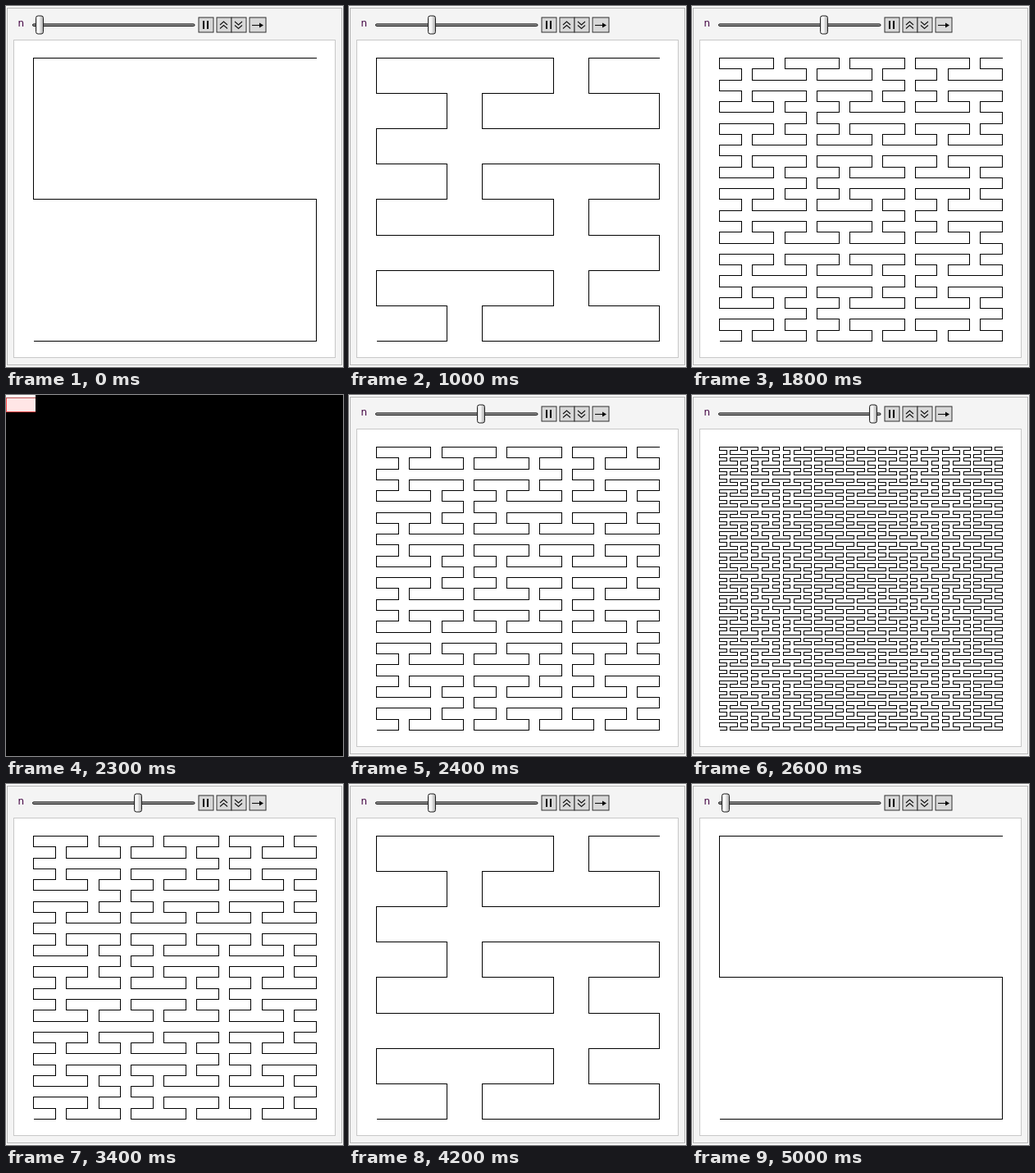
Write an HTML page that moves like this. It is 411 by 440 pixels and loops after 6000 ms.

```html
<!DOCTYPE html>
<html lang="en">
<head>
<meta charset="utf-8">
<title>Space-filling curve</title>
<style>
  html, body { margin: 0; width: 100%; height: 100%; overflow: hidden; background: #fff; }
  svg { display: block; }
  .label { font: 12px "DejaVu Sans", sans-serif; fill: #400040; }
  .button { fill: #d8d8d8; stroke: #303030; }
  .icon { fill: none; stroke: #111; stroke-width: 1.1; }
  #curve { fill: none; stroke: #000; shape-rendering: crispEdges; }
</style>
</head>
<body>
<svg width="411" height="440" viewBox="0 0 411 440">
  <defs>
    <linearGradient id="knob">
      <stop offset="0" stop-color="#d4d4d4"/>
      <stop offset=".35" stop-color="#fff"/>
      <stop offset="1" stop-color="#aaa"/>
    </linearGradient>
  </defs>

  <g id="panel">
    <rect x="1.5" y="2.5" width="408" height="435" fill="#f4f4f4" stroke="#b4b4b4"/>
    <rect x="9.5" y="41.5" width="392" height="387" fill="#fff" stroke="#c8c8c8"/>
    <text class="label" x="14.5" y="25">n</text>

    <rect x="32.5" y="21.9" width="197.5" height="2.6" rx="1.3" fill="#999" stroke="#111"/>
    <rect id="thumb" x="-4.5" y="12" width="9" height="22" rx="2.5" fill="url(#knob)" stroke="#222"/>

    <g class="button">
      <rect x="235" y="14" width="18" height="18"/>
      <rect x="257" y="14" width="18" height="18"/>
      <rect x="275" y="14" width="18" height="18"/>
      <rect x="297" y="14" width="20" height="18"/>
    </g>
    <path d="M240 18h2v10h-2zM245 18h2v10h-2z"/>
    <path class="icon" d="M261 23l4.5-4 4.5 4M261 27.500l4.500-4 4.500 4"/>
    <path class="icon" d="M279 19l4.500 4 4.500-4M279 23.500l4.500 4 4.500-4"/>
    <path class="icon" d="M300 23.500h10"/>
    <path d="M309 20.500l5 3-5 3z"/>

    <path id="curve"/>
  </g>

  <g id="blank" shape-rendering="crispEdges">
    <rect width="411" height="440"/>
    <rect width="36" height="21" fill="#fff"/>
    <rect y="3" width="36" height="18" fill="#ffe6e6"/>
    <path d="M36 3.500H.5V20.500H36" fill="none" stroke="#ff5050"/>
    <path d="M0 3.500H36" stroke="#b85050"/>
  </g>
</svg>

<script>
  const LOOP = 6000;
  const LEFT = 33, TOP = 63, SIZE = 345;
  // [start in ms, curve order]; order 0 is the blank flash
  const STEPS = [
    [0, 1], [1000, 2], [1800, 3], [2300, 0], [2400, 3],
    [2600, 4], [3400, 3], [4200, 2], [5000, 1]
  ];
  const byId = id => document.getElementById(id);
  const panel = byId('panel'), blank = byId('blank');
  const curve = byId('curve'), thumb = byId('thumb');

  // Cell of the i-th point, reading base-3 digits of i as row, column, row, ...
  function peanoCell(i, order) {
    let x = 0, y = 0, sumX = 0, sumY = 0;
    for (let k = order - 1; k >= 0; k--) {
      const pair = Math.floor(i / 9 ** k) % 9;
      const row = Math.floor(pair / 3), col = pair % 3;
      y = 3 * y + (sumX % 2 ? 2 - row : row);
      sumY += row;
      x = 3 * x + (sumY % 2 ? 2 - col : col);
      sumX += col;
    }
    return [x, y];
  }

  function peanoPath(order) {
    const last = 3 ** order - 1;
    const snap = v => Math.ceil(v - 0.5) + 0.5;
    const points = Array.from({ length: 9 ** order }, (_, i) => {
      const [x, y] = peanoCell(i, order);
      return snap(LEFT + SIZE * x / last) + ' ' + snap(TOP + SIZE * (last - y) / last);
    });
    return 'M' + points.join('L');
  }

  const paths = [1, 2, 3, 4].map(peanoPath);
  let shown = -1;

  function show(order) {
    if (order === shown) return;
    shown = order;
    blank.style.display = order ? 'none' : '';
    panel.style.display = order ? '' : 'none';
    if (!order) return;
    curve.setAttribute('d', paths[order - 1]);
    thumb.setAttribute('transform', `translate(${60 * order - 19} 0)`);
  }

  function draw(time) {
    const t = time % LOOP;
    show(STEPS.filter(([start]) => start <= t).pop()[1]);
  }

  const begin = performance.now();
  function tick() {
    draw(performance.now() - begin);
    requestAnimationFrame(tick);
  }
  tick();
</script>
</body>
</html>
```
